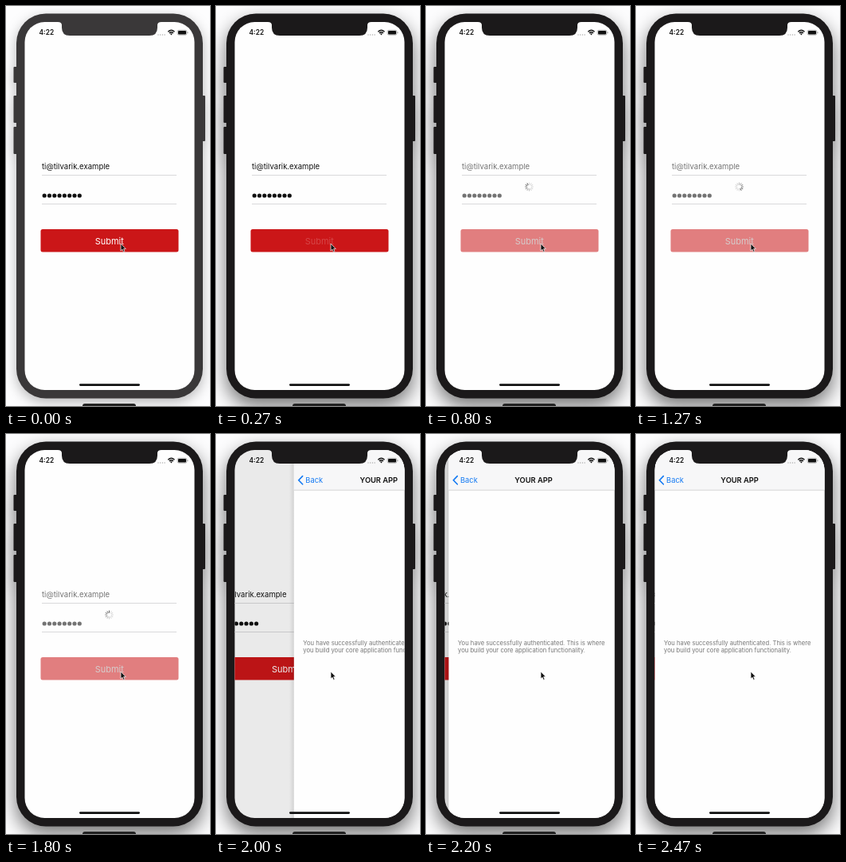
An HTML page that plays this animation: 256x500 px, repeating every 2.54 s.

```html
<!DOCTYPE html>
<html lang="en">
<head>
<meta charset="utf-8">
<title>Login flow</title>
<style>
  html, body { margin: 0; width: 100%; height: 100%; overflow: hidden; background: #fdfdfe; }
  svg { display: block; width: 100%; height: 100%; font-family: Inter, sans-serif; --case: #1b191a; }
  svg.inactive { --case: #3a3839; }
  .case { fill: var(--case); }
  #phone { filter: drop-shadow(0 10px 12px rgba(0, 0, 0, .55)); }
  .inactive #phone { filter: drop-shadow(0 5px 8px rgba(0, 0, 0, .28)); }
  .rule { stroke: #d9d9db; }
  .round { fill: none; stroke-linecap: round; }
</style>
</head>
<body>
<svg id="stage" viewBox="0 0 256 500">
  <defs>
    <clipPath id="screen"><rect x="23.5" y="20" width="213" height="460" rx="25"/></clipPath>
    <linearGradient id="edge"><stop stop-opacity="0"/><stop offset="1" stop-opacity=".1"/></linearGradient>
  </defs>

  <g id="phone" class="case">
    <rect x="13" y="9.5" width="234" height="481" rx="37"/>
    <rect x="9.5" y="76" width="5" height="20" rx="1"/>
    <rect x="9.5" y="112" width="5" height="34" rx="1"/>
    <rect x="9.5" y="151" width="5" height="34" rx="1"/>
    <rect x="245" y="112" width="5" height="57" rx="1"/>
  </g>
  <rect x="96" y="497" width="67" height="8" rx="3" fill="#222"/>

  <g clip-path="url(#screen)">
    <rect x="23" y="20" width="214" height="460" fill="#fefefe"/>
    <g id="form">
      <g id="fields">
        <text x="45" y="204" font-size="9.55" fill="#111">ti@tilvarik.example</text>
        <path class="round" d="M48.2 237H92.5" stroke="#111" stroke-width="5.2" stroke-dasharray="0 6.3"/>
      </g>
      <path class="rule" d="M45 211.5H214M45 247.5H214"/>
      <rect id="button" x="43.5" y="279" width="173" height="28.5" rx="2.5" fill="#cb1618"/>
      <text id="label" x="129.8" y="297.5" font-size="11" text-anchor="middle">Submit</text>
      <g id="spinner" class="round" transform="translate(129.5 226)" stroke="#555"></g>
    </g>
    <rect id="dim" x="23" y="20" width="214" height="460"/>
    <g id="page">
      <rect x="17.5" y="20" width="6" height="460" fill="url(#edge)"/>
      <rect x="23.5" y="20" width="214" height="460" fill="#fefefe"/>
      <rect x="23.5" y="20" width="214" height="50" fill="#f7f7f8"/>
      <path d="M23.5 70.2H237" stroke="#b9b9bb" stroke-width=".6"/>
      <g fill="#147af3" font-size="9.3">
        <path class="round" d="M34.3 52.6 29.4 57.7 34.3 62.8" stroke="#147af3" stroke-width="1.6"/>
        <text x="38" y="61">Back</text>
      </g>
      <text x="130" y="61" font-size="9.3" font-weight="600" text-anchor="middle" fill="#111">YOUR APP</text>
      <g font-size="7.65" fill="#777">
        <text x="35" y="263.5">You have successfully authenticated. This is where</text>
        <text x="35" y="273">you build your core application functionality.</text>
      </g>
    </g>
  </g>

  <path class="case" d="M65 19v1q5 0 5 4v3q0 10 10 10h100q10 0 10-10v-3q0-4 5-4v-1z"/>
  <g fill="#111">
    <text x="41.5" y="36.3" font-size="8.4" font-weight="600">4:22</text>
    <path class="round" d="M191 36H199.5" stroke="#aaa" stroke-width="1.4" stroke-dasharray="0 2.7"/>
    <path class="round" style="stroke-linecap:butt" d="M203.3 32.2q4.1-3.8 8.2 0M204.9 33.9q2.5-2.2 5 0" stroke="#111" stroke-width="1.4"/>
    <path d="M205.9 34.8q1.5-1.1 3 0l-1.5 1.7z"/>
    <rect x="215.2" y="30.2" width="11.6" height="6" rx="1.7" fill="#fefefe" stroke="#888" stroke-width=".6"/>
    <rect x="216" y="31" width="10" height="4.4" rx="1"/>
    <rect x="227.5" y="32.2" width=".9" height="2" rx=".4" fill="#888"/>
    <rect x="92" y="472.2" width="76" height="2.8" rx="1.4"/>
  </g>
  <path d="M144 297v9l2-1.8 1.5 3.2 1.5-.7-1.4-3.1h2.7z" fill="#111" stroke="#fff" stroke-width=".7"/>
</svg>
<script>
  const LOOP = 2540, STEP = 1000 / 15, LAST_STEP = 37;
  const ACTIVATE = 1, PRESS = 2, SUBMIT = 6, PUSH = 1870;
  const WIDTH = 213, PARALLAX = 64, SPOKES = 12;
  const $ = id => document.getElementById(id);

  const spokes = Array.from({ length: SPOKES }, (_, i) => {
    const spoke = document.createElementNS("http://www.w3.org/2000/svg", "path");
    spoke.setAttribute("d", "M0-2.8V-5");
    spoke.setAttribute("transform", `rotate(${i * 360 / SPOKES})`);
    $("spinner").append(spoke);
    return spoke;
  });

  // Critically damped spring: share of the push still to go.
  function remaining(time) {
    const x = Math.max(0, time - PUSH) * 0.0171;
    return (1 + x) * Math.exp(-x);
  }

  function labelOpacity(step, time) {
    if (step < PRESS || time > PUSH) return 1;
    const back = Math.min(1, Math.max(0, (step - SUBMIT + 1) / 8));
    return 0.2 + 0.8 * (1 - (1 - back) ** 2);
  }

  function draw(step) {
    const time = step * STEP;
    const pushing = time > PUSH;
    const busy = step >= SUBMIT && !pushing;
    const left = remaining(time);

    $("stage").classList.toggle("inactive", step < ACTIVATE);
    $("fields").style.opacity = busy ? 0.58 : 1;
    $("button").style.opacity = busy ? 0.55 : 1;
    $("label").style.fill = busy ? "#d6cccc" : "#fff";
    $("label").style.opacity = labelOpacity(step, time);

    $("spinner").style.display = busy ? "" : "none";
    const tick = Math.floor((Math.min(step, 27) - 6) * 8 / 9);
    spokes.forEach((spoke, i) => {
      const age = (tick + 6 - i + 2 * SPOKES) % SPOKES;
      spoke.style.opacity = Math.max(0.22, 0.95 - age * 0.11);
    });

    $("page").style.display = pushing ? "" : "none";
    $("page").setAttribute("transform", `translate(${WIDTH * left})`);
    $("form").setAttribute("transform", `translate(${-PARALLAX * (1 - left)})`);
    $("dim").style.opacity = 0.12 * (1 - left);
  }

  const start = performance.now();
  function tickFrame() {
    const time = (performance.now() - start) % LOOP;
    draw(Math.min(LAST_STEP, Math.floor((time + 4) / STEP)));
    requestAnimationFrame(tickFrame);
  }
  tickFrame();
</script>
</body>
</html>
```
